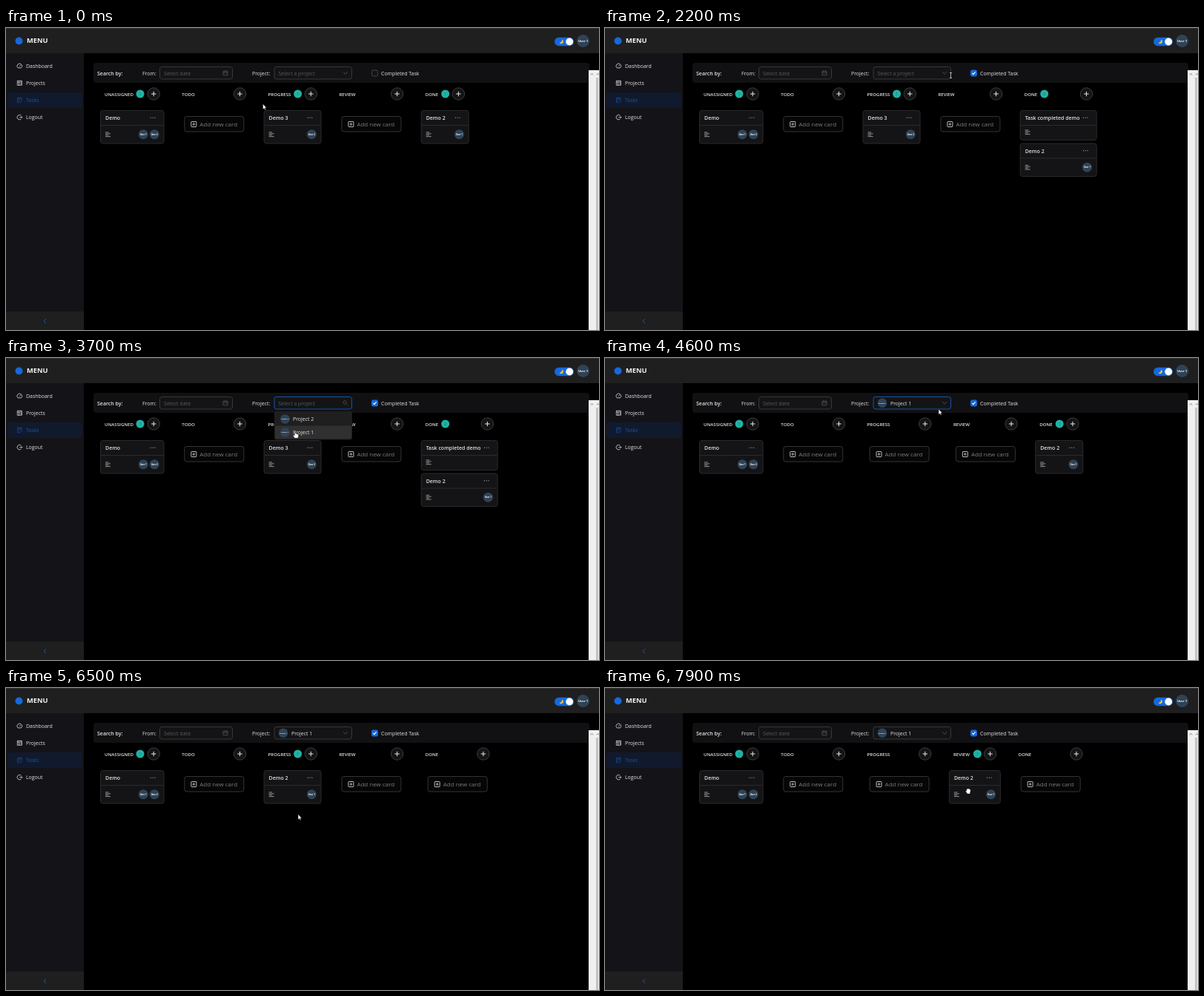
These frames come from a looping animation (800x408 px, 8 s). An HTML page with a canvas:

```html
<!DOCTYPE html>
<html lang="en">
<head>
<meta charset="utf-8">
<title>Task board</title>
<style>
html, body { margin: 0; width: 100%; height: 100%; overflow: hidden; background: #000; }
canvas { display: block; width: 800px; height: 408px; }
</style>
</head>
<body>
<canvas id="stage" width="800" height="408"></canvas>
<script>
const g = document.getElementById('stage').getContext('2d');
const LOOP = 8000, STEP = 100;
const BLUE = '#1668dc', DEEP_BLUE = '#1554ad', PANEL = '#1f1f1f', CARD = '#141416', EDGE = '#2a2a2c',
      INK = '#e4e4e4', MUTED = '#5a5a5c', SLATE = '#2f4356', TEAL = '#1fb3a5';

// Drawing helpers
function text(s, x, y, size = 6.95, color = INK, weight = 400, align = 'left') {
  g.font = `${weight} ${size}px "Open Sans", "Noto Sans", sans-serif`;
  g.textAlign = align;
  g.fillStyle = color;
  g.fillText(s, x, y + size * 0.36);
}
function box(x, y, w, h, r, fill, stroke) {
  g.beginPath();
  g.roundRect(x, y, w, h, r);
  paint(fill, stroke);
}
function disc(x, y, r, fill, stroke) {
  g.beginPath();
  g.arc(x, y, r, 0, 7);
  paint(fill, stroke);
}
function paint(fill, stroke, width = 1) {
  if (fill) { g.fillStyle = fill; g.fill(); }
  if (stroke) { g.strokeStyle = stroke; g.lineWidth = width; g.stroke(); }
}
function path(d, x, y, fill, stroke, width = 1) {
  g.save();
  g.translate(x, y);
  const p = new Path2D(d);
  if (fill) { g.fillStyle = fill; g.fill(p); }
  if (stroke) { g.strokeStyle = stroke; g.lineWidth = width; g.stroke(p); }
  g.restore();
}
function avatar(label, x, y, r = 6.5, size = 2.9) {
  disc(x, y, r, SLATE);
  text(label, x, y, size, '#fff', 700, 'center');
}

// Board data: each column is at least as wide as its heading row
const GAP = 18.3, EMPTY = 98;
const columns = [
  { name: 'UNASSIGNED', min: 86, badge: 48 },
  { name: 'TODO', min: 64.5, badge: 27 },
  { name: 'PROGRESS', min: 77.5, badge: 40 },
  { name: 'REVIEW', min: 69.5, badge: 32.5 },
  { name: 'DONE', min: 64.5, badge: 27 }
];
const demo = { title: 'Demo', users: ['User 2', 'User 1'], min: 0 };
const demo2 = { title: 'Demo 2', users: ['User 1'], min: 0 };
const demo3 = { title: 'Demo 3', users: ['User 2'], min: 0 };
const finished = { title: 'Task completed demo', users: [], min: 103.5 };

const CHECK = 1400, OPEN = 2600, PICK = 4000, DROP1 = 6400, DROP2 = 7700;
const drags = [[6100, DROP1], [7300, DROP2]];

function board(t) {
  if (t < CHECK) return [[demo], [], [demo3], [], [demo2]];
  if (t < PICK) return [[demo], [], [demo3], [], [finished, demo2]];
  if (t < DROP1) return [[demo], [], [], [], [demo2]];
  if (t < DROP2) return [[demo], [], [demo2], [], []];
  return [[demo], [], [], [demo2], []];
}

// Pointer: time, x, y, shape from that time on
const keys = [
  [0, 346.5, 102.5, 'arrow'], [300, 346.5, 102.5, 'arrow'],
  [1000, 493, 63, 'finger'], [1200, 497, 61, 'finger'], [1700, 497, 61, 'finger'],
  [1900, 489, 62, 'arrow'], [2200, 466.5, 64, 'beam'], [2500, 432, 62, 'beam'],
  [2700, 428, 63, 'beam'], [2900, 408, 80, 'finger'], [3200, 390, 98.5, 'finger'],
  [4000, 390, 99, 'finger'], [4300, 425, 80, 'arrow'], [4600, 450, 69, 'arrow'],
  [5400, 468, 76, 'arrow'], [5800, 588, 137, 'hand'], [6000, 604, 147.5, 'hand'],
  [6100, 604, 147.5, 'hand'], [6300, 400, 174, 'hand'], [6400, 394, 172, 'arrow'],
  [6500, 394, 170.5, 'arrow'], [6700, 394, 170.5, 'arrow'], [7000, 380, 148, 'hand'],
  [7200, 378, 141, 'hand'], [7300, 380, 142, 'hand'], [7500, 440, 150, 'hand'],
  [7700, 488, 142, 'hand'], [7900, 490, 139, 'hand'], [LOOP, 490, 139, 'hand']
];
function pointer(t) {
  const i = keys.findIndex(k => k[0] > t);
  const a = keys[i - 1], b = keys[i];
  const p = (t - a[0]) / (b[0] - a[0]);
  return { x: a[1] + (b[1] - a[1]) * p, y: a[2] + (b[2] - a[2]) * p, shape: a[3] };
}
function drawPointer({ x, y, shape }) {
  if (shape === 'arrow')
    path('M0 0V7.4L1.7 5.9L2.8 8.3L4 7.7L2.9 5.4H5.1Z', x, y, '#fff', '#000', 0.5);
  else if (shape === 'beam')
    path('M-1.6 -3.5H1.6M0 -3.5V3.5M-1.6 3.5H1.6', x, y, null, '#d0d0d0', 0.8);
  else if (shape === 'finger')
    path('M-.8 0Q0 -1 .8 0V3.2L4.2 4.2Q5 4.5 4.8 6L4 9.5H-.6L-3 6Q-3 4.8 -1.8 5.2L-.8 6Z', x, y, '#fff', '#000', 0.5);
  else
    path('M-2.2 -2.2Q-1.4 -3.6 -.6 -2.6Q.2 -3.8 1 -2.6Q2 -3.2 2.4 -2Q3.4 -2 3.2 0L2.2 4H-1.2L-3.4 .8Q-3.4 -.6 -2.2 0Z', x, y, '#fff', '#000', 0.4);
}

function card(c, x, y, w) {
  const h = c.users.length ? 45 : 40.5;
  box(x + 0.5, y + 0.5, w - 0.5, h - 0.5, 3, CARD, EDGE);
  g.fillStyle = EDGE;
  g.fillRect(x + 1, y + 20, w - 1.5, 1);
  text(c.title, x + 7, y + 10.9, 7, INK, 600);
  for (let i = -1; i < 2; i++) disc(x + w - 15 + i * 2.8, y + 10.2, 0.6, '#aaa');
  const m = y + (c.users.length ? 32.7 : 29.7);
  path('M0 -2.8H4.5M0 -.9H7M0 1H4.5M0 2.9H7', x + 7, m, null, '#b0b0b0', 0.8);
  c.users.forEach((u, i) => avatar(u, x + w - 12.8 - i * 15, m));
  return h;
}

function drawColumns(t, at) {
  const drag = drags.find(d => t >= d[0] && t < d[1]);
  let x = 127, ghost;
  board(t).forEach((cards, i) => {
    const col = columns[i];
    const w = cards.length ? Math.max(col.min, ...cards.map(c => c.min)) : EMPTY;
    text(col.name, x + 6, 89.5, 6.1, INK, 600);
    if (cards.length) {
      disc(x + 6 + col.badge, 89, 5.5, TEAL);
      text(cards.length, x + 6 + col.badge, 89, 6, '#27716e', 400, 'center');
    }
    disc(x + w - 13.8, 89, 8.2, CARD, '#3c3c3e');
    path('M-3.2 0H3.2M0 -3.2V3.2', x + w - 13.8, 89, null, '#e8e8e8', 1);
    if (!cards.length) {
      box(x + 9.5, 119.5, 80, 20.5, 3, '#060607', '#343436');
      box(x + 18.5, 126.5, 7, 7, 0.6, null, '#bbb');
      path('M-2 0H2M0 -2V2', x + 22, 130, null, '#bbb', 0.9);
      text('Add new card', x + 30, 130.3, 8, '#7c7c7e');
    }
    let y = 111;
    for (const c of cards) {
      if (drag && c === demo2) ghost = [c, x, y, w];
      else y += card(c, x, y, w) + 4;
    }
    x += w + GAP;
  });
  if (ghost) {
    const from = pointer(drag[0]);
    const [c, gx, gy, w] = ghost;
    card(c, gx + at.x - from.x, gy + at.y - from.y, w);
  }
}

function drawFrame() {
  g.fillStyle = '#000';
  g.fillRect(0, 0, 800, 408);
  g.fillStyle = '#141317';
  g.fillRect(0, 34, 105, 374);
  g.fillStyle = PANEL;
  g.fillRect(0, 0, 800, 34);
  g.fillRect(0, 383, 105, 25);
  g.fillStyle = '#333';
  g.fillRect(0, 0, 800, 1);
  path('M1.5 -3L-1.5 0L1.5 3', 52.5, 396, null, DEEP_BLUE);

  disc(17.5, 17.5, 5, BLUE);
  text('MENU', 28, 17.1, 9.3, '#f2f2f2', 700);
  box(740, 12.7, 26, 11.6, 5.8, BLUE);
  disc(760.2, 18.5, 4.9, '#fff');
  path('M.5 -3A3 3 0 1 1 -3 1.6A3.6 3.6 0 0 0 .5 -3Z', 749.5, 18.4, '#f4c542');
  avatar('User 1', 778.5, 17.5, 8.5, 4.2);

  box(2, 87, 101, 21, 4, '#111a2c');
  ['Dashboard', 'Projects', 'Tasks', 'Logout'].forEach((s, i) =>
    text(s, 27, 51.2 + i * 23.1, 6.95, i === 2 ? DEEP_BLUE : INK));
  path('M-2.2 2.6A3.3 3.3 0 1 1 2.2 2.6ZM0 .5L1.5 -1.2', 18.3, 51.3, null, '#ddd', 0.8);
  path('M-3 -3H3V3H-3ZM-3 -1.2H3M-.8 -1.2V3M.8 1H3', 18.3, 74.3, null, '#ddd', 0.8);
  path('M2.6 0V-3.2H-2.6V3.2H0M-1.2 -1.4H1.2M-1.2 .2H.2M.7 1.8L1.8 2.8L3.4 .9', 18.3, 97.5, null, DEEP_BLUE, 0.8);
  path('M2.2 -2.3A3.2 3.2 0 1 0 2.2 2.3M0 0H3.6M2.5 -1.1L3.6 0L2.5 1.1', 18.3, 120.6, null, '#ddd', 0.8);
}

function drawFilters(t) {
  const open = t >= OPEN && t < PICK, picked = t >= PICK;
  const focus = t >= OPEN && t < 6100;
  box(118, 47, 669, 27, 4, '#111113');
  text('Search by:', 123, 61, 7, INK, 600);
  text('From:', 184, 61);
  box(207.5, 52.5, 98, 16.5, 3, CARD, '#38383a');
  text('Select date', 213, 61, 7.1, MUTED);
  path('M-3 -2.3H3V3H-3ZM-3 -.4H3M-1.4 -3.2V-1.5M1.4 -3.2V-1.5', 296, 60.7, null, '#555', 0.8);
  text('Project:', 332, 61);
  box(362, 52.5, 104.5, 16.5, 3, CARD, focus ? DEEP_BLUE : '#38383a');
  if (picked) {
    avatar('Project 1', 374, 60.7, 6.3, 2.3);
    text('Project 1', 385, 61, 6.95);
  } else {
    text('Select a project', 367.5, 61, 6.95, MUTED);
  }
  if (open) path('M1.7 0A2.2 2.2 0 1 1 1.7 -.1M1.2 1.4L3.1 3.2', 457.5, 60, null, '#555', 0.8);
  else path('M-2.8 -1.6L0 1.7L2.8 -1.6', 458, 60.7, null, '#555', 0.8);

  const checked = t >= CHECK;
  box(493.5, 57, 8, 8, 1.5, checked ? BLUE : CARD, checked ? BLUE : '#424244');
  if (checked) path('M-2 0L-.5 1.6L2.2 -1.7', 497.4, 61, null, '#fff', 1.1);
  text('Completed Task', 506, 61.2, 6.95);
}

function drawMenu(at) {
  box(362, 72, 105, 38.5, 3, '#1f1f20');
  const hover = at.y > 91 ? 1 : 0;
  box(363, 74 + hover * 17.6, 103, 17.6, 2, '#303031');
  ['Project 2', 'Project 1'].forEach((s, i) => {
    const y = 82.5 + i * 18;
    avatar(s, 376.5, y, 6.3, 2.3);
    text(s, 387, y + 0.3, 6.95);
  });
}

function drawScrollbar() {
  g.fillStyle = '#f1f0f1';
  g.fillRect(786, 57, 14, 351);
  g.fillStyle = '#c3c3c5';
  g.fillRect(796, 67, 3, 341);
  for (const x of [790.5, 798.5]) path('M-1.6 .9L0 -.9L1.6 .9', x, 62.5, null, '#666', 0.8);
}

function render(now) {
  const t = Math.floor((now % LOOP) / STEP) * STEP;
  const at = pointer(t);
  drawFrame();
  drawFilters(t);
  drawColumns(t, at);
  if (t >= OPEN && t < PICK) drawMenu(at);
  drawScrollbar();
  drawPointer(at);
}

let start;
function tick(now) {
  start ??= now;
  render(now - start);
  requestAnimationFrame(tick);
}
requestAnimationFrame(tick);
</script>
</body>
</html>
```
